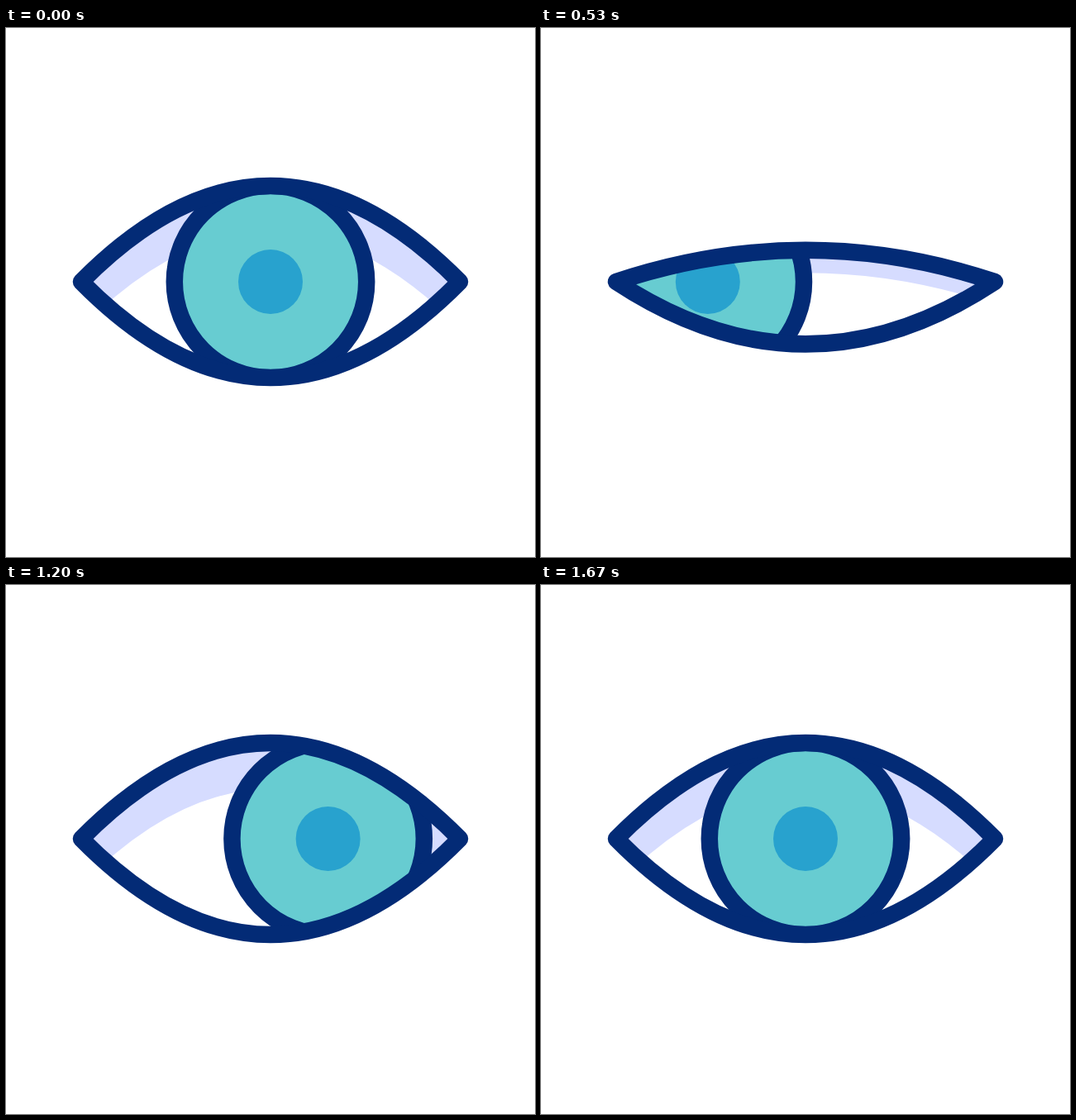
These frames come from a looping animation (640 by 640 pixels, 2 s). An HTML page:

```html
<!DOCTYPE html>
<html lang="en">
<head>
<meta charset="utf-8">
<title>Blinking eye</title>
<style>
  html, body { margin: 0; width: 100%; height: 100%; overflow: hidden; background: #fff; }
  svg { display: block; width: 100vw; height: 100vh; }
  .line { stroke: #032b76; stroke-width: 20.5; stroke-linejoin: round; }
</style>
</head>
<body>
<svg viewBox="0 0 640 640">
  <clipPath id="opening"><path id="hole"/></clipPath>
  <g clip-path="url(#opening)">
    <path id="shade" fill="#d6dcff"/>
    <g id="iris">
      <circle class="line" cx="320" cy="307" r="116.2" fill="#67ccd1"/>
      <circle cx="320" cy="307" r="39" fill="#28a2ce"/>
    </g>
  </g>
  <path id="lids" class="line" fill="none"/>
</svg>
<script>
const LOOP = 2000, FPS = 30;
const LEFT = 91, RIGHT = 549, MID = 320, AXIS = 307;
const OPEN = 116;

// Keys are [frame, value]
const gaze = [[0, 0], [14.8, -120], [15.2, -120], [31, 105], [46, 0]];
const blink = [[13.5, 0], [19.3, 1], [25.2, 0], [39.35, 0], [44.6, 1], [50, 0]];

const get = id => document.getElementById(id);
const hole = get('hole'), lids = get('lids'), shade = get('shade'), iris = get('iris');

// Cubic bezier easing (0.33, 0, 0.47, 1), solved by bisection
function ease(x) {
  let lo = 0, hi = 1;
  for (let i = 0; i < 24; i++) {
    const t = (lo + hi) / 2, r = 1 - t;
    if (0.99 * t * r * r + 1.41 * t * t * r + t * t * t < x) lo = t;
    else hi = t;
  }
  return lo * lo * (3 - 2 * lo);
}

function valueAt(keys, frame) {
  if (frame <= keys[0][0]) return keys[0][1];
  for (let i = 1; i < keys.length; i++) {
    const [a, from] = keys[i - 1], [b, to] = keys[i];
    if (frame < b) return from + (to - from) * ease((frame - a) / (b - a));
  }
  return keys[keys.length - 1][1];
}

// Closed shape between two parabolas with the given bulges
function almond(top, bottom, drop = 0) {
  const low = AXIS + drop;
  return `M${LEFT} ${AXIS}Q${MID} ${AXIS - 2 * top} ${RIGHT} ${AXIS}` +
    `L${RIGHT} ${low}Q${MID} ${low + 2 * bottom} ${LEFT} ${low}Z`;
}

function draw(ms) {
  const frame = Math.floor((ms % LOOP + 4) * FPS / 1000);
  const shut = valueAt(blink, frame);
  const top = OPEN - 152.5 * shut;
  const bottom = OPEN - 79.5 * shut;
  const outline = almond(top, bottom);
  hole.setAttribute('d', outline);
  lids.setAttribute('d', outline);
  shade.setAttribute('d', almond(top, -top, 56 * (1 - shut)));
  iris.setAttribute('transform', `translate(${valueAt(gaze, frame)} 0)`);
}

const start = performance.now();
function tick() {
  draw(performance.now() - start);
  requestAnimationFrame(tick);
}
tick();
</script>
</body>
</html>
```
